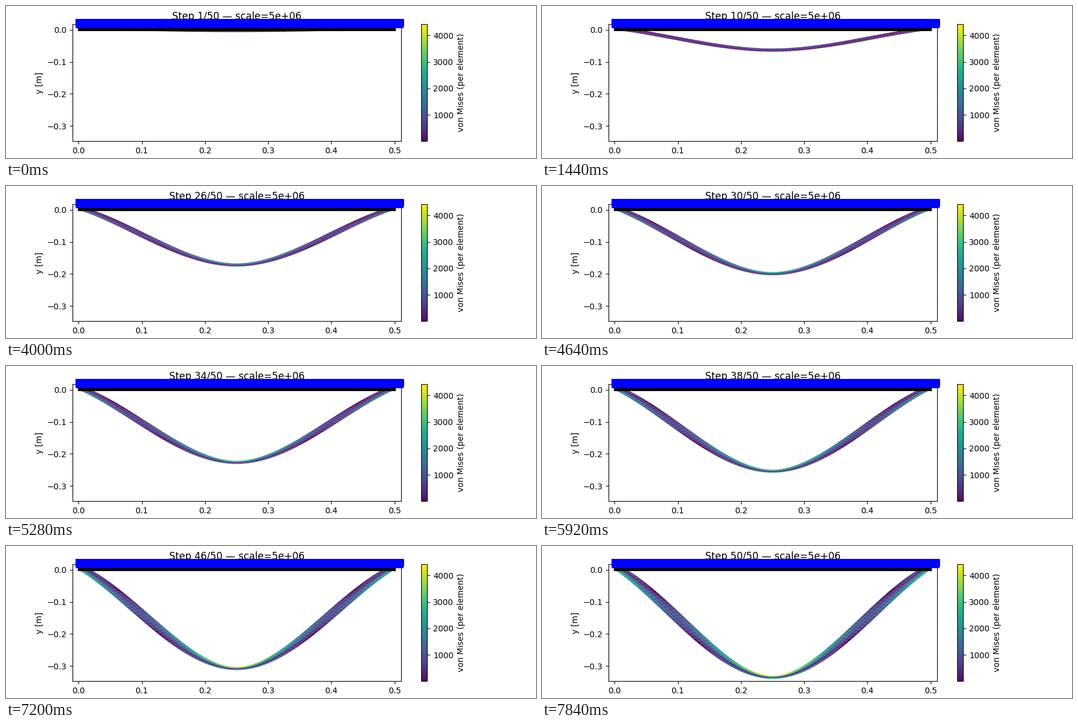
A matplotlib script for the animation above (8000 ms loop, 900 by 260 pixels).

```python
import numpy as np
import matplotlib.pyplot as plt
from matplotlib.animation import FuncAnimation
from matplotlib.collections import PolyCollection
from matplotlib.patches import Polygon, Rectangle

STEPS = 50
LENGTH, HEIGHT = 0.5, 0.01
SAG = 0.3402          # scaled mid-span deflection at full load
MARGIN = 0.0076
VMIN, VMAX = 5, 4420
NX, NY = 100, 4

fig, ax = plt.subplots(figsize=(9, 2.6), dpi=100)
ax.set_xlim(-0.01, LENGTH + 0.01)
ax.set_ylim(-SAG - MARGIN, HEIGHT + MARGIN)
ax.set_ylabel("y [m]", labelpad=3.5)
title = ax.set_title("", x=0.5015)


# Beam pinned at both bottom corners with a point load at mid-span.
def deflection(s):
    s = np.minimum(s, 1 - s)
    return (12 * s + 36 * s**2 - 64 * s**3) / 7


def slope(s):
    r = np.minimum(s, 1 - s)
    return np.sign(0.5 - s) * (12 + 72 * r - 192 * r**2) / 7 / LENGTH


def displacement(x, y):
    s = x / LENGTH
    rot, rot0 = SAG * slope(s), SAG * slope(0)
    ux = HEIGHT / 2 * (rot0 - rot) - HEIGHT * rot0 * s + y * rot
    return ux, -SAG * deflection(s)


def stress(s, t):
    """Thrust plus bending; t runs from -1 (bottom) to 1 (top)."""
    moment = 16 * np.minimum(s, 1 - s) - 3
    return np.abs(1 + moment * t)


def cells(px, py):
    p = np.stack([px, py], axis=-1)
    quads = np.stack([p[:-1, :-1], p[:-1, 1:], p[1:, 1:], p[1:, :-1]], axis=2)
    return quads.reshape(-1, 4, 2)


X, Y = np.meshgrid(np.linspace(0, LENGTH, NX + 1), np.linspace(0, HEIGHT, NY + 1))
UX, UY = displacement(X, Y)
sc, tc = np.meshgrid((np.arange(NX) + 0.5) / NX, (np.arange(NY) + 0.5) / NY * 2 - 1)
mises = stress(sc, tc).ravel()
mises *= VMAX / mises.max()

beam = PolyCollection(cells(X, Y), cmap="viridis", alpha=0.95, edgecolors="none", zorder=1)
beam.set_clim(VMIN, VMAX)
beam.set_array(mises / STEPS)
ax.add_collection(beam, autolim=False)
fig.colorbar(beam, ax=ax, label="von Mises (per element)")

ax.add_patch(Rectangle((0, 0), LENGTH, HEIGHT, fc="black", ec="black", lw=2, zorder=4))

# merged row of load arrows, in pixels from the top left
band = [(118, 22), (675, 22), (676, 23), (676, 35), (675, 36), (675, 38),
        (119, 38), (118, 36)]
ax.add_patch(Polygon([(x, 260 - y) for x, y in band], fc="blue", ec="none",
                     transform=None, clip_on=False, zorder=6))


def update(i):
    load = (i + 1) / STEPS
    beam.set_verts(cells(X + load * UX, Y + load * UY))
    beam.set_array(mises * load)
    title.set_text(f"Step {i + 1}/{STEPS} — scale=5e+06")
    return beam, title


anim = FuncAnimation(fig, update, frames=STEPS, interval=160, repeat=True, repeat_delay=0)
plt.show()
```
